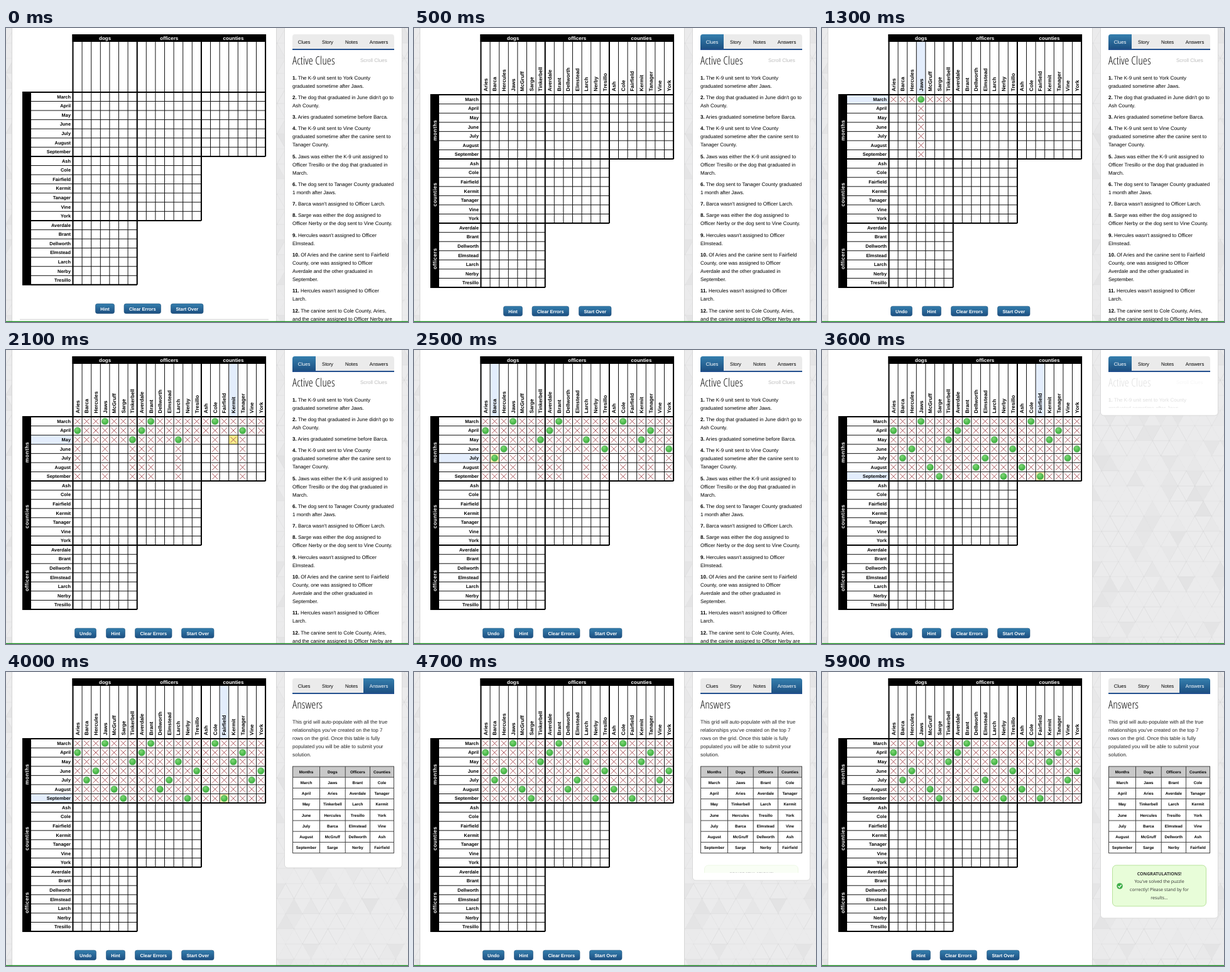
Recreate the animation shown at these times as an HTML page. Size 640x467 px, loop 6 s.

```html
<!DOCTYPE html>
<html lang="en">
<head>
<meta charset="utf-8">
<title>Logic puzzle</title>
<style>
html, body { margin: 0; width: 100%; height: 100%; overflow: hidden; background: #ebebec; }
svg { display: block; }
text { font-family: "Liberation Sans", Arial, sans-serif; font-size: 8px; text-rendering: geometricPrecision; }
.b { font-weight: bold; }
.heading { font: 350 18px "Open Sans", sans-serif; font-stretch: 75%; }
.note { font-family: "Open Sans", sans-serif; font-size: 7px; }
.side { letter-spacing: .5px; }
</style>
</head>
<body>
<svg id="stage" width="640" height="467" viewBox="0 0 640 467">
  <defs>
    <linearGradient id="blue" x2="0" y2="1"><stop stop-color="#357fae"/><stop offset="1" stop-color="#1c4e80"/></linearGradient>
    <radialGradient id="green" cx=".4" cy=".35"><stop stop-color="#82d978"/><stop offset="1" stop-color="#48b648"/></radialGradient>
  </defs>
  <g id="paper"></g>
  <g id="scene"></g>
</svg>
<script>
const LOOP = 6000, STEP = 100;
const X0 = 106.5, COL = 14.6, ROW = 14.57;

const months = ["March", "April", "May", "June", "July", "August", "September"];
const dogs = ["Aries", "Barca", "Hercules", "Jaws", "McGruff", "Sarge", "Tinkerbell"];
const officers = ["Averdale", "Brant", "Dellworth", "Elmstead", "Larch", "Nerby", "Tresillo"];
const counties = ["Ash", "Cole", "Fairfield", "Kermit", "Tanager", "Vine", "York"];
const columns = [dogs, officers, counties];
const rows = [months, counties, officers];
const solution = ["3062145", "1046325", "1436502"];   // column per month: dogs, officers, counties
const [off1, off2, off3, off4, off5, off6, off7] = officers;

const clues = [
  "The K-9 unit sent to York County|graduated sometime after Jaws.",
  "The dog that graduated in June didn't go to|Ash County.",
  "Aries graduated sometime before Barca.",
  "The K-9 unit sent to Vine County|graduated sometime after the canine sent to|Tanager County.",
  `Jaws was either the K-9 unit assigned to|Officer ${off7} or the dog that graduated in|March.`,
  "The dog sent to Tanager County graduated|1 month after Jaws.",
  `Barca wasn't assigned to Officer ${off5}.`,
  `Sarge was either the dog assigned to|Officer ${off6} or the dog sent to Vine County.`,
  `Hercules wasn't assigned to Officer|${off4}.`,
  `Of Aries and the canine sent to Fairfield|County, one was assigned to Officer|${off1} and the other graduated in|September.`,
  `Hercules wasn't assigned to Officer|${off5}.`,
  `The canine sent to Cole County, Aries,|and the canine assigned to Officer ${off6} are`
];

const rect = (x, y, w, h, fill, more = "") => `<rect x="${x}" y="${y}" width="${w}" height="${h}" fill="${fill}" ${more}/>`;
const line = (x1, y1, x2, y2, w = 1, color = "#111") => `<path d="M${x1} ${y1}L${x2} ${y2}" stroke="${color}" stroke-width="${w}"/>`;
const text = (x, y, s, more = "") => `<text x="${x}" y="${y}" ${more}>${s}</text>`;
const center = (x, y, s, more = "") => text(x, y, s, 'text-anchor="middle" ' + more);
const upright = (x, y, s, more = "") => text(0, 0, s, `transform="translate(${x} ${y}) rotate(-90)" ${more}`);
const range = (n, f) => Array.from({ length: n }, (_, i) => f(i)).join("");

// Linear interpolation through [time, value] points.
function track(t, ...points) {
  const i = points.findIndex(p => t <= p[0]);
  if (i < 0) return points.at(-1)[1];
  if (i === 0) return points[0][1];
  const [[t0, a], [t1, b]] = [points[i - 1], points[i]];
  return a + (b - a) * (t - t0) / (t1 - t0);
}

function paper() {
  let seed = 7;
  const random = () => (seed = seed * 16807 % 2147483647) / 2147483647;
  let out = rect(0, 0, 640, 467, "#ebebec");
  for (let r = 0; r < 20; r++) for (let c = 0; c < 50; c++) {
    const x = c * 13.5 - 14, y = r * 24, up = (r + c) % 2, k = random();
    const d = up ? `M${x} ${y + 24}h27l-13.5-24z` : `M${x} ${y}h27l-13.5 24z`;
    out += `<path d="${d}" fill="#777" fill-opacity="${k < .3 ? k * .22 : 0}" stroke="#999" stroke-opacity="${k > .7 ? .14 : .03}" stroke-width=".6"/>`;
  }
  return out + rect(9.5, -2, 421, 480, "#fff", 'stroke="#d6d6d6"');
}

const cellOf = k => ({ row: Math.floor(k / 3), section: k % 3, col: +solution[k % 3][Math.floor(k / 3)] });

function marks(t, y0) {
  const progress = track(t, [1000, 0], [1300, 1], [2100, 8.5], [3000, 19], [3200, 21]) + 1e-6;
  const done = Math.floor(progress), crossing = progress % 1 >= .5;
  const active = t >= 1000 && t < 4500 ? cellOf(crossing || !done ? done : done - 1) : null;
  let under = "", over = "";
  if (active) {
    const c = active.section * 7 + active.col;
    under += rect(X0 + c * COL, 22, COL, y0 - 22, "#e3edfc") + rect(40, y0 + active.row * ROW, X0 - 40, ROW, "#e3edfc");
    if (progress > 1.4) under += rect(X0 + c * COL, y0 + active.row * ROW, COL, ROW, crossing ? "#fbf08c" : "#fdf7b8");
  }
  const placed = Array.from({ length: done }, (_, k) => cellOf(k));
  for (let r = 0; r < 7; r++) for (let c = 0; c < 21; c++) {
    const section = Math.floor(c / 7), col = c % 7;
    const x = X0 + (c + .5) * COL, y = y0 + (r + .5) * ROW;
    const hits = placed.filter(p => p.section === section && (p.row === r || p.col === col));
    const here = active && active.row === r && active.section === section && active.col === col;
    if (hits.some(p => p.row === r && p.col === col))
      over += `<circle cx="${x}" cy="${y}" r="5.2" fill="url(#green)" stroke="#45a548" stroke-width=".6"/>`;
    else if (hits.length || here && crossing)
      over += `<path d="M${x - 4.7} ${y - 4.7}l9.4 9.4m0-9.4l-9.4 9.4" stroke="#a9545a" stroke-width="1"/>`;
  }
  return [under, over];
}

function grid(t, loaded) {
  const y0 = loaded ? 106.1 : 101.9, x = i => X0 + i * COL, y = i => y0 + i * ROW;
  const [under, over] = marks(t, y0);
  let out = under + rect(26, y0, 14, 21 * ROW, "#000") + rect(105.5, 10, 308.5, 12, "#000");
  out += range(22, i => line(x(i), 22, x(i), y(i < 8 ? 21 : i < 15 ? 14 : 7)));
  out += range(22, i => line(40, y(i), x(i < 8 ? 21 : i < 15 ? 14 : 7), y(i)));
  [21, 21, 14, 7].forEach((end, i) => {
    out += line(x(i * 7), 10, x(i * 7), y(end), 2, "#000");
    out += line(26, y(i * 7), x(end), y(i * 7), 2, "#000");
  });
  ["dogs", "officers", "counties"].forEach((s, i) => out += center(x(i * 7 + 3.5), 18.7, s, 'class="b" fill="#fff"'));
  rows.flat().forEach((s, i) => out += text(103, y(i + .5) + 2.5, s, 'class="b" text-anchor="end" style="font-size:7.4px"'));
  if (loaded) {
    columns.flat().forEach((s, i) => out += upright(x(i + .5) + 2.9, 100.4, s, 'class="b" style="font-size:8.2px"'));
    ["months", "counties", "officers"].forEach((s, i) =>
      out += upright(36, y(i * 7 + 3.5) + 5.3, s, 'class="b side" text-anchor="middle" fill="#fff" style="font-size:8.3px"'));
  }
  return out + over;
}

function buttons(t, loaded) {
  const y = loaded ? 442 : 438, undo = t >= 1200 && t < 5000;
  const row = undo ? [["Undo", 109.5, 34], ["Hint", 159.5, 30], ["Clear Errors", 205.5, 58.5], ["Start Over", 279.5, 51.5]]
    : [["Hint", 142.5, 30], ["Clear Errors", 188, 58.5], ["Start Over", 262.5, 51.5]];
  return row.map(([s, x, w]) => rect(x, y, w, 15.5, "url(#blue)", 'rx="3" stroke="#1d5079" stroke-width=".6"')
    + center(x + w / 2, y + 10.6, s, 'class="b" fill="#fff" style="font-size:7.4px"')).join("")
    + line(22, y + 25, 418, y + 25, 1, "#ccc");
}

function tabs(active) {
  let out = `<path d="M456 34V14q0-4 4-4H614q4 0 4 4V34z" fill="#ebebeb"/>`;
  if (active === 0) out += `<path d="M456 34V14q0-4 4-4H493V34z" fill="url(#blue)"/>`;
  if (active === 3) out += `<path d="M569 34V10H614q4 0 4 4V34z" fill="url(#blue)"/>`;
  out += rect(456, 33, 162, 2, "#23508f");
  [["Clues", 474.5], ["Story", 512], ["Notes", 550], ["Answers", 593.5]].forEach(([s, x], i) =>
    out += center(x, 24.7, s, `fill="${i === active ? "#fff" : "#000"}" style="font-size:7.7px"`));
  return out;
}

function clueList() {
  let y = 81.6, out = text(456, 58, "Active Clues", 'class="heading" fill="#111"') + text(564, 53.6, "Scroll Clues", 'fill="#bbb"');
  clues.forEach((clue, n) => {
    clue.split("|").forEach((s, i) => {
      out += text(456, y, (i ? "" : `<tspan class="b">${n + 1}.</tspan> `) + s);
      y += 13;
    });
    y += 5.27;
  });
  return out;
}

function answers() {
  const edges = [456.5, 499.5, 540.2, 579.5, 617.5], top = 150, h = 17.2;
  let out = text(456, 58, "Answers", 'class="heading" fill="#111"');
  ["This grid will auto-populate with all the true", "relationships you've created on the top 7", "rows on the grid. Once this table is fully",
    "populated you will be able to submit your", "solution."].forEach((s, i) => out += text(456, 81.6 + i * 13, s, 'fill="#222"'));
  out += rect(456, top, 162, h, "#c9c9c9");
  out += range(9, i => line(456, top + i * h, 618, top + i * h, 1, "#444"));
  edges.forEach(x => out += line(x, top, x, top + 8 * h, 1, "#444"));
  const table = [["Months", "Dogs", "Officers", "Counties"],
    ...months.map((m, r) => [m, ...columns.map((list, i) => list[solution[i][r]])])];
  table.forEach((cells, r) => cells.forEach((s, c) =>
    out += center((edges[c] + edges[c + 1]) / 2, top + (r + .5) * h + 2.2, s, 'class="b" style="font-size:6.3px"')));
  return out;
}

function congratulations() {
  let out = rect(462.5, 307, 149, 65, "#e8fdd9", 'rx="6" stroke="#b9e39c"');
  out += '<circle cx="474" cy="340" r="4.8" fill="#3fae49"/><path d="M471.5 340l2 2 3.2-4" fill="none" stroke="#fff" stroke-width="1.3"/>';
  ["CONGRATULATIONS!", "You've solved the puzzle", "correctly! Please stand by for", "results..."].forEach((s, i) =>
    out += center(537, 322.6 + i * 12.8, s, `class="note${i ? "" : " b"}" fill="#333"`));
  return out;
}

function panel(t, loaded) {
  const showAnswers = t >= 3700;
  const bottom = track(t, [3400, 600], [3500, 500], [3600, 104], [3700, 70], [3900, 311], [4600, 311], [5000, 391]);
  const fade = track(t, [3400, 1], [3500, .55], [3600, .13], [3700, 0], [3900, 1]);
  const praise = track(t, [4600, 0], [5000, 1]);
  return rect(443.5, -8, 187, bottom + 8, "#fff", 'rx="5" stroke="#d9d9d9"')
    + tabs(showAnswers ? 3 : loaded ? 0 : -1)
    + `<svg width="640" height="${Math.max(bottom - 12, 36)}"><g opacity="${fade}">${showAnswers ? answers() : clueList()}</g>`
    + `<g opacity="${praise}">${praise ? congratulations() : ""}</g></svg>`;
}

const scene = document.getElementById("scene");
document.getElementById("paper").innerHTML = paper();
let shown = -1;
function draw(now) {
  const t = Math.floor(now % LOOP / STEP) * STEP;
  if (t !== shown) {
    const loaded = t >= 300;
    scene.innerHTML = grid(t, loaded) + buttons(t, loaded) + panel(t, loaded) + rect(0, 465.7, 640, 1.3, "#158a1c");
    shown = t;
  }
  requestAnimationFrame(draw);
}
draw(0);
</script>
</body>
</html>
```
